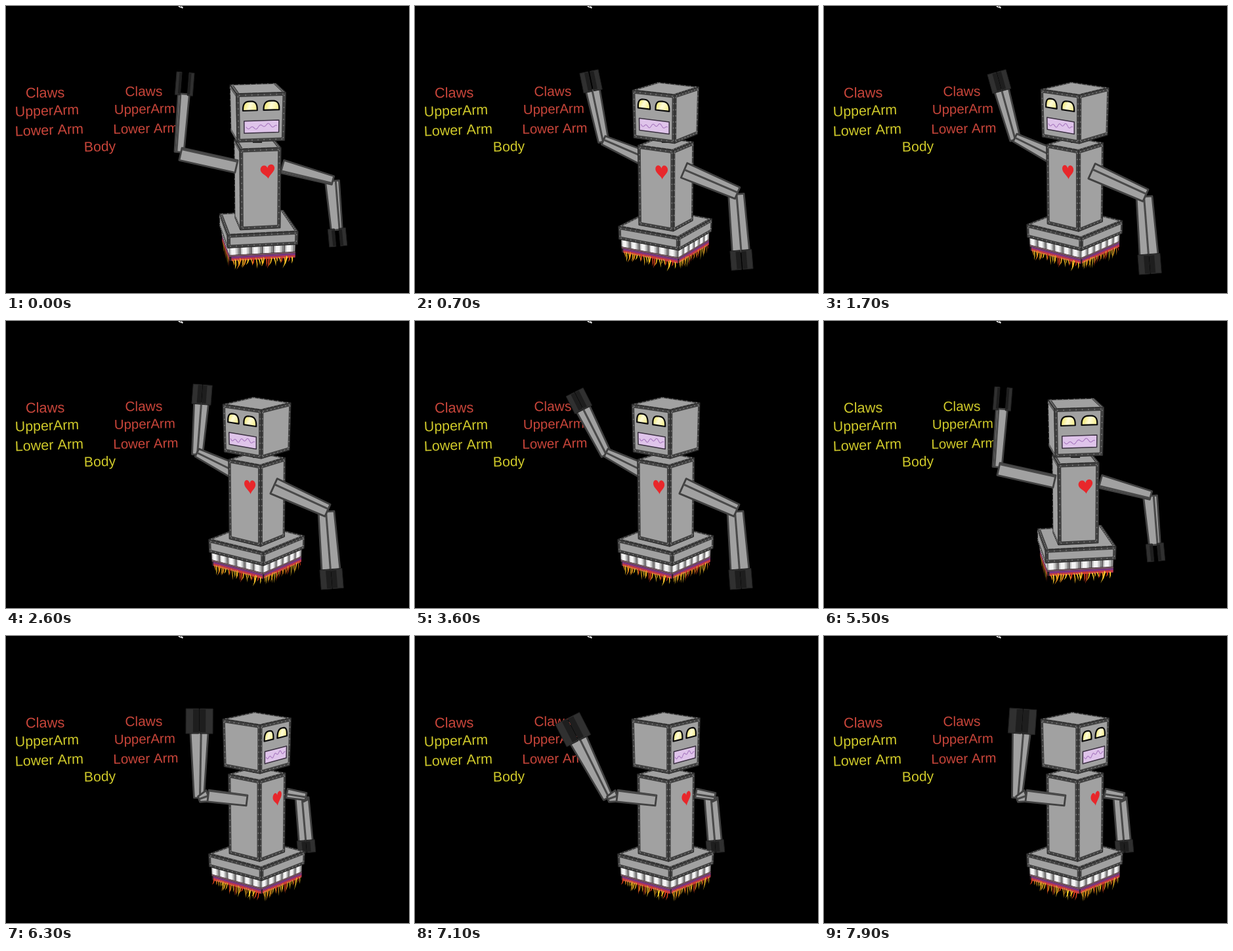
An HTML page with a canvas for the animation above (8000 ms loop, 614 by 438 pixels).

```html
<!DOCTYPE html>
<html lang="en">
<head>
<meta charset="utf-8">
<title>Waving robot</title>
<style>
html, body { margin: 0; width: 614px; height: 438px; overflow: hidden; background: #000; }
canvas { display: block; }
</style>
</head>
<body>
<canvas id="stage" width="614" height="438"></canvas>
<script>
const ctx = document.getElementById('stage').getContext('2d');
const LOOP = 8000, CX = 382.5, RAD = Math.PI / 180;
const RED = '#c8453a', YELLOW = '#cfc92a';
const GREY = '#a1a1a1', TRIM = '#414141', RIVET = '#7c7c7c';

// arm: shoulder x y w, elbow x y w, forearm base x y w,
// forearm length, wrist w, claw length, claw w, claw gap, edge split 1, edge split 2, angle
const POSES = {
  rest: {
    yaw: 9.5,
    left: [351, 245, 19, 266, 226, 19, 264, 223, 14, 89, 17, 33, 27, 11, .1, .2, 4.5],
    right: [421, 245, 20, 498, 266, 13, 497, 267, 21, 75, 17, 25, 27, 7, .15, .25, 174.7]
  },
  turnLeft: {
    yaw: -38,
    left: [356, 233, 24, 291, 201, 13, 291.5, 204, 16, 79, 22, 28, 29, 1.5, .5, .5, 0],
    right: [408, 252, 25, 490, 289, 20, 488, 291, 24, 90, 28, 28, 34, 1.5, .62, .52, 175.5]
  },
  turnRight: {
    yaw: 50,
    left: [367, 251, 16, 308, 244, 18, 294, 247, 15, 100, 27, 36, 41, 1.5, .05, .6, 0],
    right: [428, 240, 14, 457, 245, 11, 451, 247, 20, 67, 21, 17, 27, 1.5, .4, .5, 175]
  }
};

// text, x, baseline, size, tilt, picked
const LABELS = [
  ['Claws', 30, 140, 21.8, -.6, 0],
  ['UpperArm', 14, 168.5, 21.4, -2, 1],
  ['Lower Arm', 14, 198.5, 21.6, -2.2, 1],
  ['Body', 119, 222.3, 21.2, -1.5, 1],
  ['Claws', 181.5, 137.5, 20.9, -.4, 0],
  ['UpperArm', 165, 165, 20.4, -1.2, 0],
  ['Lower Arm', 163.5, 195, 20.5, -1.2, 0]
];

const lerp = (a, b, k) => a + (b - a) * k;
const wave = (t, peak, period) => Math.cos((t - peak) / period * 2 * Math.PI);

function mix(a, b, k) {
  const arm = s => a[s].map((v, i) => lerp(v, b[s][i], k));
  return { yaw: lerp(a.yaw, b.yaw, k), left: arm('left'), right: arm('right') };
}

function swing(pose, angle) {
  return { ...pose, left: [...pose.left.slice(0, -1), angle] };
}

function poseAt(t) {
  const rest = POSES.rest;
  const toLeft = swing(POSES.turnLeft, -10.5 - 16.5 * wave(t, 3650, 2440));
  const toRight = swing(POSES.turnRight, -12 + 16 * wave(t, 7900, 1440));
  const ease = (from, to) => {
    const k = Math.min(1, Math.max(0, (t - from) / (to - from)));
    return k * k * (3 - 2 * k);
  };
  if (t < 4700) return mix(rest, toLeft, ease(100, 900));
  if (t < 5500) return mix(toLeft, rest, ease(4700, 5450));
  return mix(rest, toRight, ease(5550, 6300));
}

function poly(pts, fill, stroke, width) {
  ctx.beginPath();
  pts.forEach(p => ctx.lineTo(p[0], p[1]));
  ctx.closePath();
  if (fill) { ctx.fillStyle = fill; ctx.fill(); }
  if (stroke) { ctx.strokeStyle = stroke; ctx.lineWidth = width; ctx.stroke(); }
}

function project(x, y, z) {
  return [CX + x * (1 + z / 950), y + z * (.11 + .00062 * y)];
}

// maps u, v in 0..1 on one upright side of a box to the stage
function sideMap(box, angle) {
  const s = Math.sin(angle), c = Math.cos(angle);
  return (u, v) => {
    const h = lerp(box.h, box.h2, v), r = h * (2 * u - 1);
    return project(s * h + c * r, lerp(box.top, box.bottom, v), c * h - s * r);
  };
}

function topMap(box, yaw) {
  const s = Math.sin(yaw), c = Math.cos(yaw);
  return (u, v) => {
    const x = box.h * (2 * u - 1), z = box.h * (2 * v - 1);
    return project(c * x + s * z, box.top, c * z - s * x);
  };
}

const rect = (P, u0, v0, u1, v1) => [P(u0, v0), P(u1, v0), P(u1, v1), P(u0, v1)];

function plate(P, w, h, trim) {
  const du = trim / w, dv = trim / h;
  poly(rect(P, 0, 0, 1, 1), TRIM, '#2a2a2a', 1);
  poly(rect(P, du, dv, 1 - du, 1 - dv), GREY);
  ctx.fillStyle = RIVET;
  const dot = (u, v) => {
    const p = P(u, v);
    ctx.fillRect(p[0] - .8, p[1] - .8, 1.6, 1.6);
  };
  const nu = Math.round(w / 9), nv = Math.round(h / 9);
  for (let i = 0; i < nu; i++) {
    dot((i + .5) / nu, dv / 2);
    dot((i + .5) / nu, 1 - dv / 2);
  }
  for (let i = 0; i < nv; i++) {
    dot(du / 2, (i + .5) / nv);
    dot(1 - du / 2, (i + .5) / nv);
  }
}

function eachSide(box, yaw, draw) {
  for (let i = -1; i < 3; i++) {
    const angle = yaw + i * Math.PI / 2;
    if (Math.cos(angle) > .05) draw(sideMap(box, angle), i);
  }
}

function drawBox(box, yaw) {
  plate(topMap(box, yaw), 2 * box.h, 2 * box.h, box.trim);
  eachSide(box, yaw, (P, i) => {
    plate(P, 2 * box.h, box.bottom - box.top, box.trim);
    if (i === 0 && box.detail) box.detail(P);
  });
}

function eye(P, u0, u1) {
  const pts = [];
  for (let i = 0; i <= 16; i++) {
    const a = Math.PI * i / 16, c = Math.cos(a);
    const x = Math.sign(c) * Math.pow(Math.abs(c), .7);
    pts.push(P(lerp(u0, u1, (1 - x) / 2), .355 - .19 * Math.pow(Math.sin(a), .7)));
  }
  const a = P(u0, .2), b = P(u1, .3);
  const g = ctx.createLinearGradient(a[0], a[1], b[0], b[1]);
  g.addColorStop(0, '#f0e25a');
  g.addColorStop(.5, '#fffcd8');
  g.addColorStop(1, '#f6ec8a');
  poly(pts, g, '#0a0a0a', 2.2);
}

function drawFace(P) {
  eye(P, .13, .42);
  eye(P, .55, .87);
  poly(rect(P, .15, .57, .87, .82), '#dfc4ea', '#3a3040', 1.5);
  ctx.beginPath();
  for (let i = 0; i <= 40; i++) {
    const k = i / 40;
    const p = P(.19 + .64 * k, .69 + .03 * Math.sin(k * 24) + .03 * Math.sin(k * 7));
    ctx.lineTo(p[0], p[1]);
  }
  ctx.strokeStyle = '#a97ac0';
  ctx.lineWidth = 1.1;
  ctx.stroke();
}

function drawHeart(P) {
  const pts = [];
  for (let i = 0; i < 40; i++) {
    const a = i / 40 * 2 * Math.PI;
    const x = 16 * Math.sin(a) ** 3;
    const y = 13 * Math.cos(a) - 5 * Math.cos(2 * a) - 2 * Math.cos(3 * a) - Math.cos(4 * a);
    pts.push(P(.675 + x * .0108 - y * .001, .28 - y * .006 - x * .0006));
  }
  poly(pts, '#e8272b');
}

const HEAD = { h: 37, h2: 35.5, top: 126, bottom: 198.5, trim: 5, detail: drawFace };
const BODY = { h: 31, h2: 30, top: 210, bottom: 331, trim: 5, detail: drawHeart };
const BASE = { h: 52, h2: 51.5, top: 330.5, bottom: 350, trim: 4.5 };
const SKIRT = { h: 49, h2: 48, top: 350, bottom: 385 };

function drawSkirt(yaw) {
  eachSide(SKIRT, yaw, (P, side) => {
    let seed = 71 + side * 13;
    const rand = () => (seed = (seed * 16807) % 2147483647) / 2147483647;
    for (let i = 0; i < 10; i++) rand();
    poly(rect(P, 0, 0, 1, .58), '#2b2026');
    for (let i = 0; i < 6; i++) {
      const u = i / 6;
      poly(rect(P, u, .02, u + .16, .32), '#8d8d8d');
      poly(rect(P, u + .01, .02, u + .125, .32), '#c9c9c9');
      poly(rect(P, u + .03, .02, u + .095, .32), '#f4f4f4');
    }
    poly(rect(P, 0, .33, 1, .4), '#74545f');
    poly(rect(P, .03, .4, 1, .48), '#7d3584');
    poly(rect(P, .03, .47, 1, .58), '#c23a48');
    const colors = ['#e2451c', '#f5951c', '#ffd02a', '#f0b01e'];
    for (let i = 0; i < 24; i++) {
      const u = .04 + i / 24 * .94, len = .14 + rand() * .3, lean = (rand() - .6) * .05;
      poly([P(u, .46 + rand() * .08), P(u + .022, .55), P(u + .022 + lean, .58 + len * .5),
        P(u + lean * 2, .58 + len), P(u + .006 + lean, .58 + len * .45)],
        colors[Math.floor(rand() * 4)]);
    }
  });
}

// tapered beam with a dark edge running along it
function beam(x0, y0, w0, x1, y1, w1, split) {
  const d = Math.hypot(x1 - x0, y1 - y0) || 1;
  const nx = (y1 - y0) / d, ny = -(x1 - x0) / d;
  const at = (x, y, w, k) => [x + nx * w * (k - .5), y + ny * w * (k - .5)];
  poly([at(x0, y0, w0, 0), at(x1, y1, w1, 0), at(x1, y1, w1, 1), at(x0, y0, w0, 1)],
    GREY, TRIM, 2.8);
  const a = at(x0, y0, w0, split), b = at(x1, y1, w1, split);
  ctx.beginPath();
  ctx.moveTo(a[0], a[1]);
  ctx.lineTo(b[0], b[1]);
  ctx.strokeStyle = '#4a4a4a';
  ctx.lineWidth = 3;
  ctx.stroke();
}

function drawArm(arm) {
  const [sx, sy, sw, ex, ey, ew, fx, fy, fw, len, ww, clawLen, clawW, gap, k1, k2, deg] = arm;
  const dx = Math.sin(deg * RAD), dy = -Math.cos(deg * RAD);
  const wx = fx + dx * len, wy = fy + dy * len;
  beam(fx, fy, fw, wx, wy, ww, 1 - k2);
  const at = (side, along) => [wx - dy * side + dx * along, wy + dx * side + dy * along];
  for (const s of [-1, 1]) {
    const a = s * gap / 2, b = s * clawW / 2, m = lerp(a, b, .45);
    poly([at(a, -2), at(a, clawLen), at(b, clawLen), at(b, -2)], '#303030', '#202020', 1);
    poly([at(m, 0), at(m, clawLen - 1), at(a, clawLen - 1), at(a, 0)], '#1e1e1e');
  }
  if (Math.hypot(fx - ex, fy - ey) > 4) beam(fx, fy + 2, 9, ex, ey, ew, .5);
  beam(sx, sy, sw, ex, ey, ew, k1);
}

function drawLabels(t) {
  const none = t < 300 || (t >= 4500 && t < 5100);
  const all = t >= 5100 && t < 5700;
  for (const [text, x, y, size, tilt, picked] of LABELS) {
    ctx.save();
    ctx.translate(x, y);
    ctx.rotate(tilt * RAD);
    ctx.font = size + 'px "Liberation Sans", Arial, sans-serif';
    ctx.fillStyle = all || (picked && !none) ? YELLOW : RED;
    ctx.fillText(text, 0, 0);
    ctx.restore();
  }
}

function draw(t) {
  ctx.fillStyle = '#000';
  ctx.fillRect(0, 0, 614, 438);
  poly([[262, 0], [265, 0], [267, 3], [264, 2]], '#d8d8d8');
  poly([[267, 0], [270, 2], [269, 4], [266, 2]], '#eee');
  drawLabels(t);

  const pose = poseAt(t), yaw = pose.yaw * RAD;
  // the arm on the far side of the turn is hidden by the body
  const [far, near] = pose.yaw < 0 ? [pose.left, pose.right] : [pose.right, pose.left];
  ctx.lineJoin = 'round';
  drawArm(far);
  drawSkirt(yaw);
  drawBox(BASE, yaw);
  drawBox(BODY, yaw);
  poly([[375, 198], [391, 198], [390, 209], [376, 209]], '#2c2c2c');
  drawBox(HEAD, yaw);
  drawArm(near);
}

function tick() {
  draw(performance.now() % LOOP);
  requestAnimationFrame(tick);
}
tick();
</script>
</body>
</html>
```
